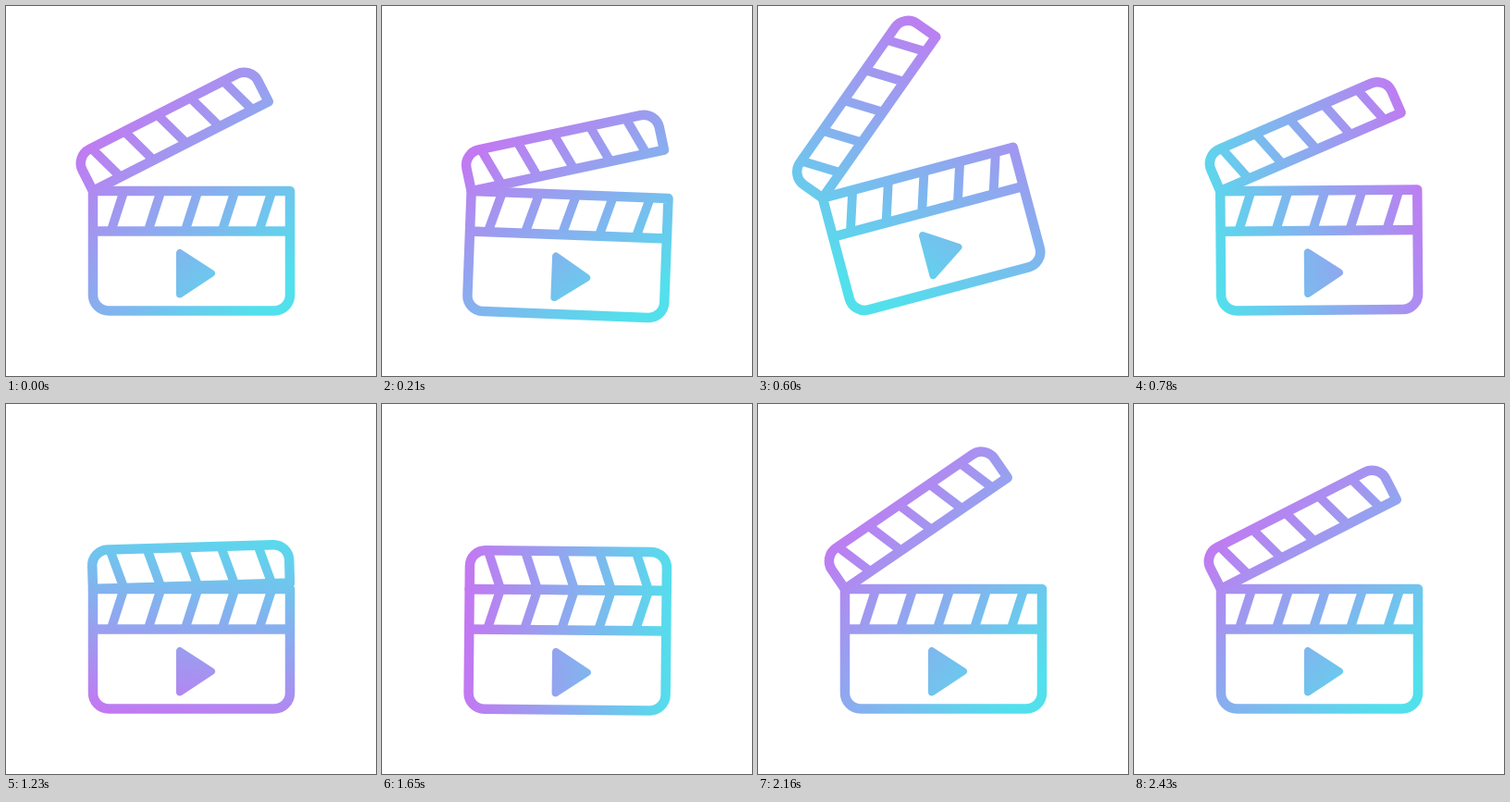
An HTML page with a canvas for the animation above (4.46 s loop, 400 by 400 pixels).

```html
<!DOCTYPE html>
<html lang="en">
<head>
<meta charset="utf-8">
<title>Clapperboard</title>
<style>
  html, body { margin: 0; width: 100%; height: 100%; overflow: hidden; background: #fff; }
  canvas { display: block; width: 100vw; height: 100vh; }
</style>
</head>
<body>
<canvas id="stage"></canvas>
<script>
const LOOP = 4460, SIZE = 400;
const PURPLE = '#c774f2', CYAN = '#52e0ec';
const HINGE = [94, 200];
const LEFT = 94, RIGHT = 307, TOP = 158, BAR = 243.5, BOTTOM = 329.5, RADIUS = 17;

// [time in ms, degrees]
const TILT = [[0, 0], [130, 5], [460, -15], [590, -15], [805, 0], [1610, 0], [1800, 5], [2070, 0]];
const OPEN = [[0, 27], [150, 13], [600, 40], [1000, 0], [1020, 0], [1215, 1.75], [1400, 0],
              [1900, 0], [2100, 37], [2280, 27]];
const SPIN = [[0, 45], [360, 68], [780, 165], [1230, 280], [1650, 361], [1980, 392], [2430, 405]];

const canvas = document.getElementById('stage');
const ctx = canvas.getContext('2d');
const dpr = window.devicePixelRatio || 1;
canvas.width = canvas.height = SIZE * dpr;

const rad = deg => deg * Math.PI / 180;

// Sine ease in and out between neighbouring keys
function eased(keys, t) {
  const i = keys.findIndex(k => k[0] > t);
  if (i < 0) return keys[keys.length - 1][1];
  const [t0, a] = keys[i - 1], [t1, b] = keys[i];
  return a + (b - a) * (1 - Math.cos(Math.PI * (t - t0) / (t1 - t0))) / 2;
}

// Smooth curve through all keys, resting at both ends
function smooth(keys, t) {
  const last = keys.length - 1;
  const i = keys.findIndex(k => k[0] > t);
  if (i < 0) return keys[last][1];
  const slope = n => n === 0 || n === last ? 0
    : (keys[n + 1][1] - keys[n - 1][1]) / (keys[n + 1][0] - keys[n - 1][0]);
  const [t0, a] = keys[i - 1], [t1, b] = keys[i];
  const d = t1 - t0, u = (t - t0) / d, v = 1 - u;
  return a * (1 + 2 * u) * v * v + b * u * u * (3 - 2 * u)
    + d * (slope(i - 1) * u * v * v - slope(i) * u * u * v);
}

function rotateAbout([x, y], deg) {
  ctx.translate(x, y);
  ctx.rotate(rad(deg));
  ctx.translate(-x, -y);
}

// Box with two square corners on the hinge line and two round ones at endY
function frame(endY) {
  ctx.lineWidth = 10.5;
  ctx.beginPath();
  ctx.moveTo(LEFT, HINGE[1]);
  ctx.arcTo(LEFT, endY, RIGHT, endY, RADIUS);
  ctx.arcTo(RIGHT, endY, RIGHT, HINGE[1], RADIUS);
  ctx.lineTo(RIGHT, HINGE[1]);
  ctx.closePath();
  ctx.stroke();
}

function stripes(endY) {
  ctx.lineWidth = 9.8;
  ctx.beginPath();
  for (let i = 0; i < 5; i++) {
    const x = 127.5 + i * 40;
    ctx.moveTo(x, HINGE[1]);
    ctx.lineTo(x - 14, endY);
  }
  ctx.stroke();
}

function body() {
  frame(BOTTOM);
  stripes(BAR);
  ctx.lineWidth = 10.5;
  ctx.beginPath();
  ctx.moveTo(LEFT, BAR);
  ctx.lineTo(RIGHT, BAR);
  ctx.stroke();

  ctx.lineWidth = 8;
  ctx.beginPath();
  ctx.moveTo(188, 267);
  ctx.lineTo(188, 311.5);
  ctx.lineTo(222, 289);
  ctx.closePath();
  ctx.fill();
  ctx.stroke();
}

function arm(open) {
  rotateAbout(HINGE, -open);
  frame(TOP);
  stripes(TOP);
}

function tint(angle, lift) {
  const cx = 200, cy = 240 - 1.2 * lift, half = 118 + 0.7 * lift;
  const dx = half * Math.cos(rad(angle)), dy = half * Math.sin(rad(angle));
  const g = ctx.createLinearGradient(cx - dx, cy - dy, cx + dx, cy + dy);
  g.addColorStop(0, PURPLE);
  g.addColorStop(1, CYAN);
  ctx.globalCompositeOperation = 'source-in';
  ctx.fillStyle = g;
  ctx.fillRect(0, 0, SIZE, SIZE);
}

function draw(t) {
  const tilt = eased(TILT, t), open = eased(OPEN, t);
  ctx.setTransform(dpr, 0, 0, dpr, 0, 0);
  ctx.globalCompositeOperation = 'source-over';
  ctx.clearRect(0, 0, SIZE, SIZE);
  ctx.fillStyle = ctx.strokeStyle = '#000';
  ctx.lineJoin = 'round';

  ctx.save();
  rotateAbout(tilt < 0 ? [111, 296] : [94, 270], tilt);
  body();
  arm(open);
  ctx.restore();

  tint(smooth(SPIN, t), Math.max(0, open - tilt));
}

const start = performance.now();
function tick() {
  draw((performance.now() - start) % LOOP);
  requestAnimationFrame(tick);
}
tick();
</script>
</body>
</html>
```
